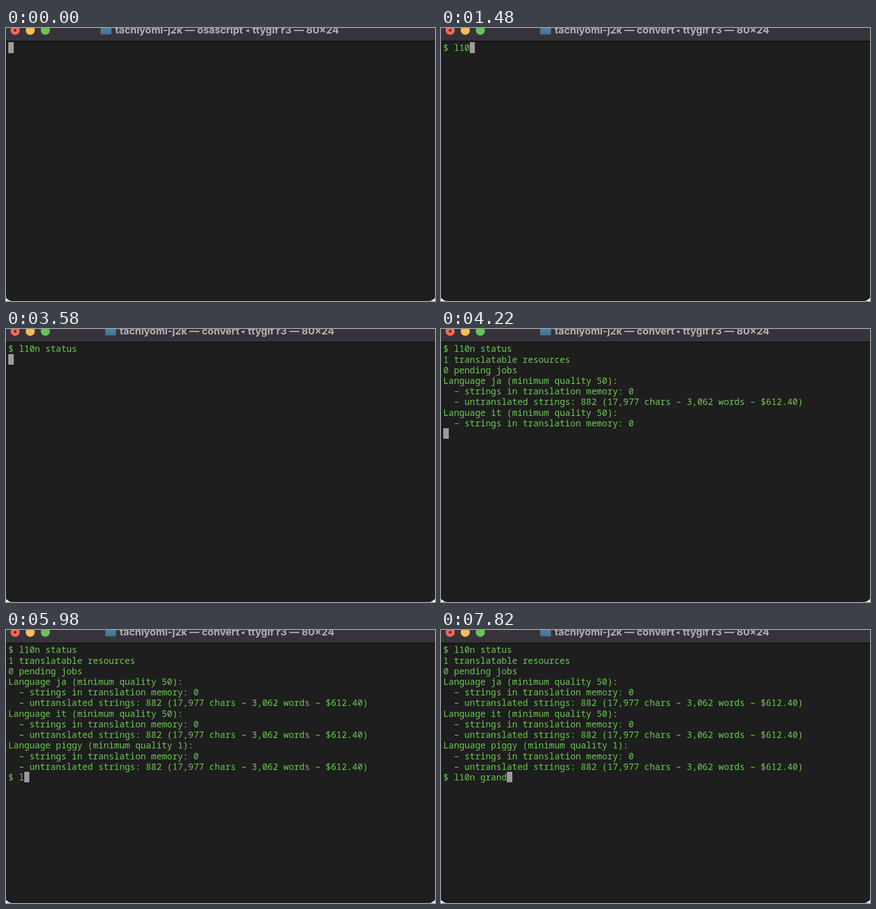
Animation, 938 px wide and 597 px high, one loop 8 s. Source, as an HTML page with a canvas:

```html
<!DOCTYPE html>
<html lang="en">
<head>
<meta charset="utf-8">
<title>Terminal</title>
<style>
  html, body { margin: 0; width: 100%; height: 100%; overflow: hidden; background: #fff; }
  canvas { display: block; }
</style>
</head>
<body>
<canvas id="stage" width="938" height="597"></canvas>
<script>
const ctx = document.getElementById('stage').getContext('2d');
const W = 938, H = 597, LOOP = 8000;
const CELL = 11.58, ROW = 23.23, LEFT = 5, TOP = 31.3;

const memory = '  – strings in translation memory: 0\n';
const missing = '  – untranslated strings: 882 (17,977 chars – 3,062 words – $612.40)\n';
const language = (name, quality) => `Language ${name} (minimum quality ${quality}):\n`;

// Each entry appends its text to the terminal at the given time.
const output = [
  [200, '$ '],
  ...keys('l10n status', [1060, 1320, 1480, 1810, 1990, 2140, 2390, 2450, 2590, 2750, 2880]),
  [3580, '\n'],
  [4120, '1 translatable resources\n0 pending jobs\n' + language('ja', 50) + memory],
  [4220, missing + language('it', 50) + memory],
  [4320, missing + language('piggy', 1) + memory + missing],
  [5980, '$ '],
  ...keys('l10n grand', [5980, 6190, 6350, 6700, 6940, 7170, 7290, 7350, 7610, 7820])
];

function keys(text, times) {
  return times.map((time, i) => [time, text[i]]);
}

function disc(x, y, r, color) {
  ctx.fillStyle = color;
  ctx.beginPath();
  ctx.arc(x, y, r, 0, Math.PI * 2);
  ctx.fill();
}

function drawWindow() {
  ctx.fillStyle = '#fff';
  ctx.fillRect(0, 0, W, H);
  ctx.fillStyle = '#1e1e1e';
  ctx.beginPath();
  ctx.roundRect(-3, -20, W + 6, H + 20, [0, 0, 17, 17]);
  ctx.fill();
  ctx.fillStyle = '#37333a';
  ctx.fillRect(0, 0, W, 28);
  ctx.fillStyle = '#050505';
  ctx.fillRect(0, 28, W, 1.4);
  disc(20, 5, 10, '#ed6a5f');
  disc(20, 5, 3, '#8c1a10');
  disc(53, 5, 10, '#f6be50');
  disc(86, 5, 10, '#62c555');
}

// The folder and title are centred as one block that starts at x.
function drawTitle(process, x) {
  const right = W - 3 - x;
  const tail = 'ttygif r3 — 80×24';
  const blue = ctx.createLinearGradient(0, 0, 0, 14);
  blue.addColorStop(0, '#4d81a3');
  blue.addColorStop(1, '#437293');
  ctx.fillStyle = blue;
  ctx.beginPath();
  ctx.roundRect(x, -6, 23.5, 20, 1.5);
  ctx.fill();

  ctx.fillStyle = '#b3b0b5';
  ctx.font = '700 21.8px Inter, sans-serif';
  ctx.fillText(`tachiyomi-j2k — ${process}`, x + 31.5, 12);
  const tailX = right - ctx.measureText(tail).width;
  ctx.fillText(tail, tailX, 12);
  ctx.beginPath();
  ctx.moveTo(tailX - 15, 6);
  ctx.lineTo(tailX - 7.5, 2.2);
  ctx.lineTo(tailX - 7.5, 9.8);
  ctx.fill();
}

function drawTerminal(t) {
  const text = output.filter(([time]) => time <= t).map(entry => entry[1]).join('');
  const lines = text.split('\n');
  const row = lines.length - 1;
  const col = lines[row].length;
  ctx.fillStyle = '#6bc950';
  ctx.font = '500 19.3px "Noto Sans Mono", monospace';
  lines.forEach((line, i) => ctx.fillText(line, LEFT, TOP + 19 + i * ROW));

  const cellX = n => Math.round(LEFT + n * CELL);
  const cellY = n => Math.round(TOP + n * ROW);
  ctx.fillStyle = '#9d9b9d';
  ctx.fillRect(cellX(col), cellY(row), cellX(col + 1) - cellX(col), cellY(row + 1) - cellY(row));
}

function draw(now) {
  const t = now % LOOP;
  drawWindow();
  if (t < 100) drawTitle('osascript', 207);
  else drawTitle('convert', 217);
  drawTerminal(t);
  requestAnimationFrame(draw);
}

requestAnimationFrame(draw);
</script>
</body>
</html>
```
